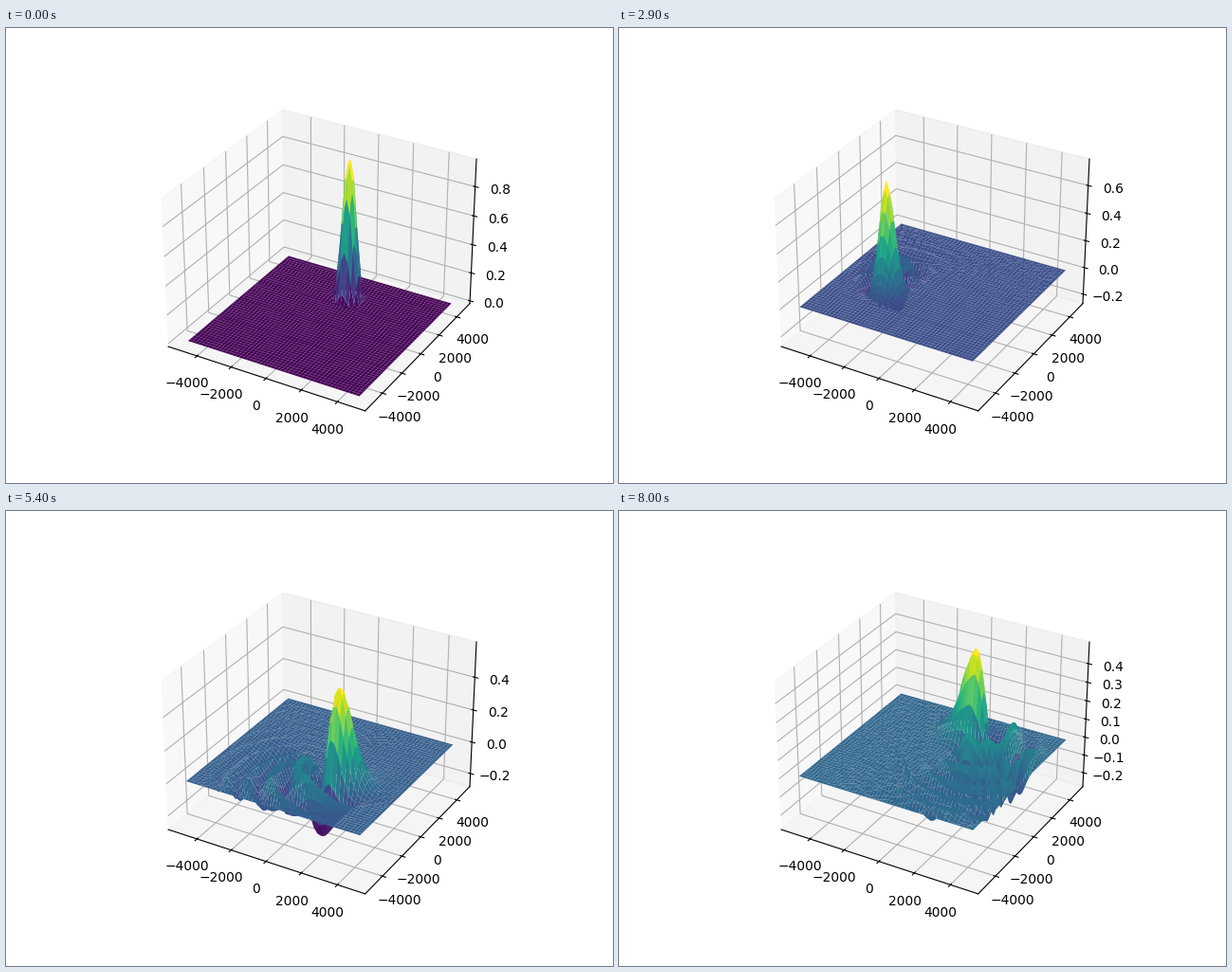
Animation, 640 px wide and 480 px high, one loop 8.1 s. Source, as a matplotlib script:

```python
import numpy as np
import matplotlib.pyplot as plt
from matplotlib.animation import FuncAnimation

FRAMES = 81
SUBSTEPS = 6
HALF = 5000
DX = 200
PAD = 1 / 48

axis = np.arange(-HALF, HALF, DX, dtype=float)
X, Y = np.meshgrid(axis, axis)
omega = 2 * np.pi / (FRAMES - 1)  # one turn over the loop, in rad per frame


def cosine_bell(x0, y0, radius):
    r = np.minimum(np.hypot(X - x0, Y - y0) / radius, 1)
    return 0.5 * (1 + np.cos(np.pi * r))


def tendency(q):
    """Centred advection by solid-body rotation, fixed edges."""
    out = np.zeros_like(q)
    qx = (q[1:-1, 2:] - q[1:-1, :-2]) / (2 * DX)
    qy = (q[2:, 1:-1] - q[:-2, 1:-1]) / (2 * DX)
    out[1:-1, 1:-1] = omega * (Y[1:-1, 1:-1] * qx - X[1:-1, 1:-1] * qy)
    return out


def rk4(q, dt):
    k1 = tendency(q)
    k2 = tendency(q + dt / 2 * k1)
    k3 = tendency(q + dt / 2 * k2)
    k4 = tendency(q + dt * k3)
    return q + dt / 6 * (k1 + 2 * k2 + 2 * k3 + k4)


def simulate():
    q = cosine_bell(0, HALF / 2, 850)
    fields = [q]
    for _ in range(FRAMES - 1):
        for _ in range(SUBSTEPS):
            q = rk4(q, 1 / SUBSTEPS)
        fields.append(q)
    return fields


def corners(a):
    return np.stack([a[:-1, :-1], a[:-1, 1:], a[1:, 1:], a[1:, :-1]], -1).reshape(-1, 4)


def padded(low, high, margin):
    extra = (high - low) * margin
    return low - extra, high + extra


fields = simulate()
quads_x, quads_y = corners(X), corners(Y)

fig = plt.figure(figsize=(6.4, 4.8), dpi=100)
ax = fig.add_subplot(projection="3d")
surface = ax.plot_surface(X, Y, fields[0], cmap="viridis")
side = padded(*padded(axis[0], axis[-1], 0.05), PAD)
ax.set_xlim(side)
ax.set_ylim(side)
ax.set_xticks(range(-4000, 4001, 2000))
ax.set_yticks(range(-4000, 4001, 2000))


def update(i):
    z = fields[i]
    quads_z = corners(z)
    surface.set_verts(np.stack([quads_x, quads_y, quads_z], -1))
    height = quads_z.mean(axis=1)
    surface.set_array(height)
    surface.set_clim(height.min(), height.max())

    low, high = z.min(), z.max()
    step = 0.2 if high - low > 0.8 else 0.1
    first, last = np.ceil(low / step - 1e-9), np.floor(high / step + 1e-9)
    ax.set_zticks(np.arange(first, last + 1) * step + 0.0)
    ax.set_zlim(padded(low, high, PAD))
    return (surface,)


anim = FuncAnimation(fig, update, frames=FRAMES, interval=100, repeat=True,
                     repeat_delay=0, blit=False)
plt.show()
```
